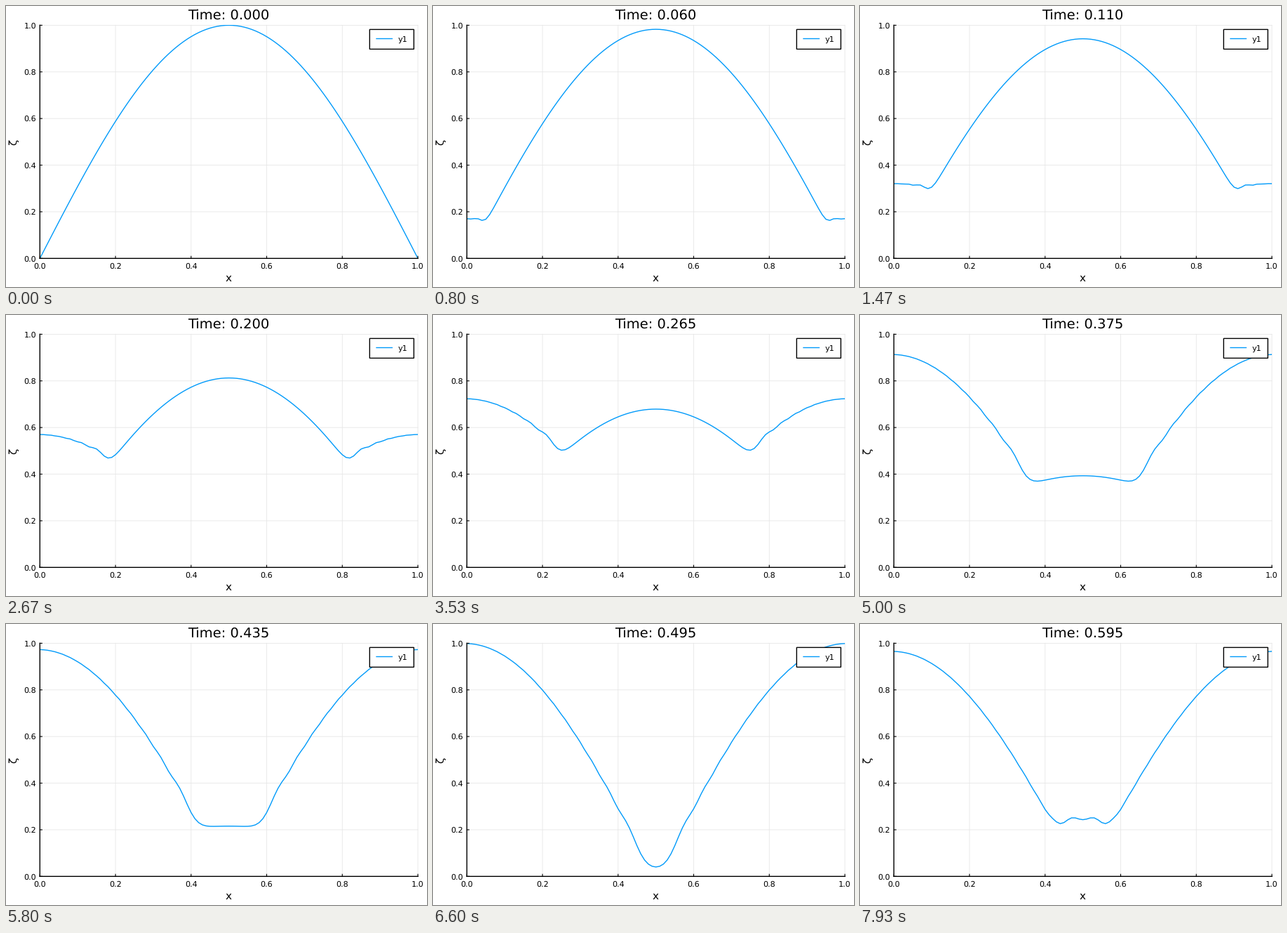
Recreate the animation shown at these times as a matplotlib script. Size 600x400 px, loop 8000 ms.

```python
import numpy as np
import matplotlib.pyplot as plt
from matplotlib.animation import FuncAnimation
from matplotlib.patches import Rectangle

plt.rcParams.update({
    "font.family": "DejaVu Sans",
    "text.hinting": "none",
    "path.snap": False,
})

W, H, DPI = 600, 400, 100
TICK_MS, LOOP_MS, DT = 20, 8000, 0.005
LEFT, RIGHT, TOP, BOTTOM = 48.3, 587.0, 27.4, 359.3
BLUE = "#009afa"

# Shallow water in a closed basin on a staggered grid, solved by its cosine modes
N, DX = 101, 0.01
SPEED = np.sqrt(9.81 * 0.1)
cells = np.arange(N)
x = cells * DX
modes = np.cos(np.pi * np.outer(cells, cells + 0.5) / N)
amps = modes @ np.sin(np.pi * x) * 2 / N
amps[0] /= 2
omega = 2 * SPEED / DX * np.sin(np.pi * cells / (2 * N))


def surface(t):
    return (amps * np.cos(omega * t)) @ modes


def px(v):
    return LEFT + (RIGHT - LEFT) * v


def py(v):
    return BOTTOM - (BOTTOM - TOP) * v


fig = plt.figure(figsize=(W / DPI, H / DPI), dpi=DPI, facecolor="white")
ax = fig.add_axes([0, 0, 1, 1])
ax.set_xlim(0, W)
ax.set_ylim(H, 0)
ax.axis("off")


def line(xs, ys, color="black", width=1.0, z=4, **kw):
    return ax.plot(xs, ys, color=color, lw=width, zorder=z, **kw)[0]


def label(tx, ty, text, size, ha="center", **kw):
    return ax.text(tx, ty, text, fontsize=size, ha=ha, va="baseline",
                   zorder=7, **kw)


for v in np.arange(6) / 5:
    gx, gy = px(v), py(v)
    line([gx, gx], [TOP, BOTTOM], "#e6e6e6", 0.6, 1)
    line([LEFT, RIGHT], [gy, gy], "#e6e6e6", 0.6, 1)
    line([gx, gx], [BOTTOM, BOTTOM - 3], width=0.8)
    line([LEFT, LEFT + 3], [gy, gy], width=0.8)
    label(gx, 374.2, f"{v:.1f}", 8)
    label(43.4, gy + 4.1, f"{v:.1f}", 8, "right")

line([LEFT, RIGHT], [BOTTOM, BOTTOM], solid_capstyle="projecting")
line([LEFT, LEFT], [BOTTOM, TOP], solid_capstyle="projecting")

label(317.1, 392.0, "x", 11)
label(15.5, 193.4, "ζ", 11, rotation=90, rotation_mode="anchor")
title = label(317.1, 18.9, "", 14)

curve = line(px(x), py(surface(0)), BLUE, 1.0, 3, solid_joinstyle="round")
curve.set_clip_path(Rectangle((LEFT, TOP), RIGHT - LEFT, BOTTOM - TOP,
                              transform=ax.transData))

ax.add_patch(Rectangle((518.3, 33.4), 63, 28, fc="white", ec="black",
                       lw=1.0, zorder=5))
line([528, 550.3], [46.5, 46.5], BLUE, 1.0, 6)
label(558.7, 50.7, "y1", 8, "left")


def draw(i):
    # 15 steps a second: three steps in every ten ticks
    t = (3 * i + 2) // 10 * DT
    curve.set_ydata(py(surface(t)))
    title.set_text(f"Time: {t:.3f}")
    return curve, title


anim = FuncAnimation(fig, draw, frames=LOOP_MS // TICK_MS, interval=TICK_MS,
                     repeat=True, repeat_delay=0)
plt.show()
```
